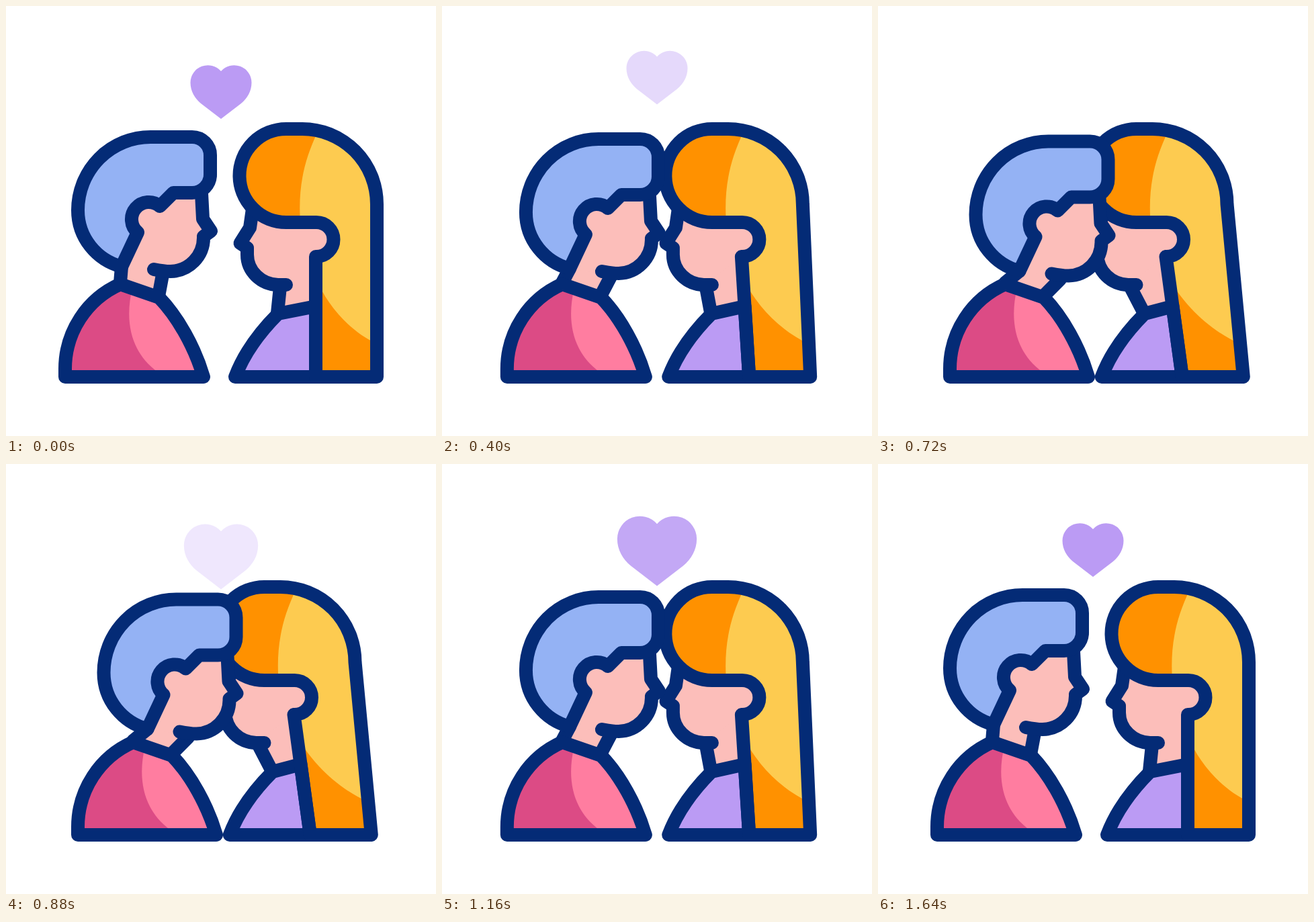
An HTML page that plays this animation: 640x640 px, repeating every 2.04 s.

```html
<!DOCTYPE html>
<html lang="en">
<head>
<meta charset="utf-8">
<title>Couple</title>
<style>
  html, body { margin: 0; width: 100%; height: 100%; overflow: hidden; background: #fff; }
  svg { display: block; width: 100vw; height: 100vh; }
  .line { fill: none; stroke: #042b76; stroke-width: 20; stroke-linecap: round; stroke-linejoin: round; }
</style>
</head>
<body>
<svg id="stage" viewBox="0 0 640 640"></svg>
<script>
const LOOP = 2040, STEP = 40;
const SKIN = '#fcbeba', BLUE = '#94b2f4', ROSE = '#dc4b85', PINK = '#ff7da0',
      LILAC = '#bb9bf4', ORANGE = '#ff9100', YELLOW = '#fdcb50';
const stage = document.getElementById('stage');

const fill = (color, d) => `<path fill="${color}" d="${d}"/>`;
const line = d => `<path class="line" d="${d}"/>`;
const shift = (x, y, content) => `<g transform="translate(${x} ${y})">${content}</g>`;

// Linear track of [time, value] pairs
function track(t, keys) {
  if (t <= keys[0][0]) return keys[0][1];
  for (let i = 1; i < keys.length; i++) {
    const [t0, v0] = keys[i - 1], [t1, v1] = keys[i];
    if (t <= t1) return v0 + (v1 - v0) * (t - t0) / (t1 - t0);
  }
  return keys[keys.length - 1][1];
}

// Cubic bezier easing with control points (.52, 0) and (.62, 1)
function ease(x) {
  let lo = 0, hi = 1;
  for (let i = 0; i < 24; i++) {
    const u = (lo + hi) / 2, v = 1 - u;
    if (3 * u * v * v * .52 + 3 * u * u * v * .62 + u ** 3 < x) lo = u; else hi = u;
  }
  return lo * lo * (3 - 2 * lo);
}

function heart(t) {
  const alpha = track(t, [[200, 1], [520, 0], [776, 0], [1217, 1]]);
  const y = track(t, [[40, 0], [510, -28], [776, 13], [1209, 0]]);
  const size = track(t, [[520, 1], [776, 1.18], [1160, 1.3], [1640, 1]]);
  return `<g opacity="${alpha}" transform="translate(320 ${128 + y}) scale(${size})">` +
    fill(LILAC, 'M0 40L-30 17C-39 9.5-45.5-1-45.5-14A26 26 0 0 1 0-31A26 26 0 0 1 45.5-14C45.5-1 39 9.5 30 17Z') + '</g>';
}

function woman(p) {
  const head = -32.5 * p, body = -8.2 * p;
  const lean = (x, y, top) => `${x + head + (body - head) * (y - top) / (552 - top)} ${y}`;
  const back = y => lean(461, y, 373), edge = y => lean(552, y, 295);
  const at = (x, y) => `${x + head} ${y}`, low = (x, y) => `${x + body} ${y}`;

  const face = 'M367 302L363 330L348.5 353L359 360V370A47 45 0 0 0 405 415';
  const bust = `M${low(341, 552)}C${low(355, 515)} ${low(378, 485)} ${low(405, 458)}L${back(447)}L${back(552)}Z`;
  const hair = `M${at(417, 183)}H${441 + head}A111 112 0 0 1 ${edge(295)}L${edge(552)}L${back(552)}L${back(373)}` +
    `H${462 + head}A25.5 25.5 0 0 0 ${at(462, 322)}H${417 + head}A69.5 69.5 0 0 1 ${at(417, 183)}Z`;
  const tip = `M${back(405)}C${lean(478, 445, 373)} ${lean(510, 483, 340)} ${edge(503)}L${edge(552)}L${back(552)}Z`;

  return fill(SKIN, `M${at(400, 380)}L${at(405, 415)}L${low(404, 458)}L${back(447)}L${back(373)}Z`) +
    line(`M${at(408, 418)}L${low(404, 457)}`) +
    fill(LILAC, bust) +
    shift(head, 0, fill(SKIN, `${face}L461 373H462A25.5 25.5 0 0 0 462 322H417Z`)) +
    fill(YELLOW, hair) + fill(ORANGE, tip) +
    shift(head, 0, fill(ORANGE, 'M464 187C441 235 435 275 438 322H417A69.5 69.5 0 0 1 417 183H441Z') +
      line(face + 'H417')) +
    line(bust) + line(hair);
}

function man(p) {
  const head = 38.5 * p, drop = 6.5 * p, body = 19 * p;
  const at = (x, y) => `${x + head} ${y + drop}`, low = (x, y) => `${x + body} ${y}`;

  const face = 'M291 279L293 317L305 335L294 343V345A50 50 0 0 1 245 395';
  const ear = 'H249L229 298A25.5 25.5 0 0 0 196 337L172 388';
  const hair = `M215 195H277A27 27 0 0 1 304 222V251A27 27 0 0 1 277 278${ear}C135 378 107 345 107 304A108 109 0 0 1 215 195Z`;
  const bust = 'M88 552V540A138 138 0 0 1 170 414L228 434C256 463 281 508 294 552Z';

  return fill(SKIN, `M${at(196, 337)}L${at(172, 388)}L${low(170, 412)}L${low(227, 432)}L${at(233, 400)}L${at(245, 390)}Z`) +
    line(`M${at(172, 388)}L${low(170, 412)}M${at(233, 400)}L${low(227, 432)}`) +
    shift(body, 0, fill(ROSE, bust) +
      fill(PINK, 'M188 420C176 470 186 516 226 545H294C281 508 256 463 228 434Z') + line(bust)) +
    shift(head, drop, fill(SKIN, `${face}L233 398L172 388L196 337A25.5 25.5 0 0 1 229 298L249 278Z`) +
      line(face + 'Q235 395 220 392') + fill(BLUE, hair) + line(hair));
}

function draw(now) {
  const t = Math.floor(now % LOOP / STEP) * STEP;
  // Lean in, hold, lean back: symmetric about 780 ms
  const p = ease(Math.max(0, Math.min(1, (700 - Math.abs(t - 780)) / 600)));
  stage.innerHTML = heart(t) + woman(p) + man(p);
}

const start = performance.now();
(function frame() {
  draw(performance.now() - start);
  requestAnimationFrame(frame);
})();
</script>
</body>
</html>
```
